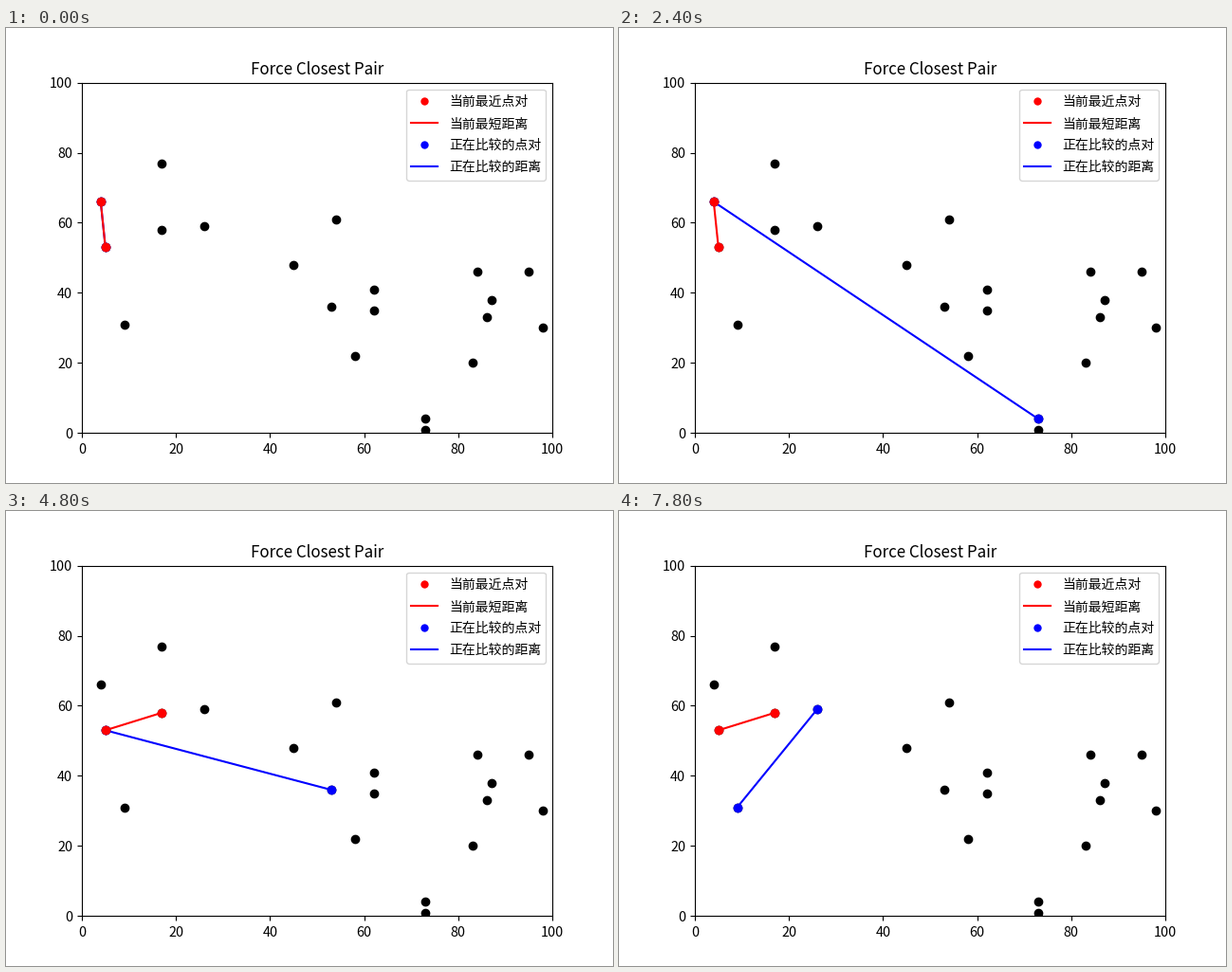
A matplotlib script that plays this animation: 640x480 px, repeating every 8 s.

```python
from itertools import combinations
from math import dist

import matplotlib.pyplot as plt
from matplotlib.animation import FuncAnimation
from matplotlib.lines import Line2D
from matplotlib.patches import FancyBboxPatch

W, H, DPI = 640, 480, 100
STEPS, STEP_MS = 40, 200
EM = 10 * DPI / 72  # legend font size in pixels

plt.rcParams["font.family"] = "Noto Sans CJK JP"

# The input of the search, sorted by x.
points = [
    (4, 66), (5, 53), (9, 31), (17, 58), (17, 77), (26, 59), (45, 48),
    (53, 36), (54, 61), (58, 22), (62, 35), (62, 41), (73, 1), (73, 4),
    (83, 20), (84, 46), (86, 33), (87, 38), (95, 46), (98, 30),
]
pairs = list(combinations(points, 2))[:STEPS]

fig, ax = plt.subplots(figsize=(W / DPI, H / DPI), dpi=DPI)
ax.set(xlim=(0, 100), ylim=(0, 100))
ax.set_title("Force Closest Pair", fontsize=12.2)
ax.tick_params(labelsize=10.4)
ax.tick_params(axis="x", pad=4)

ax.plot(*zip(*points), "o", color="black")
compared, = ax.plot([], [], "o-", color="blue")
closest, = ax.plot([], [], "o-", color="red")


def draw_legend(rows):
    """Lay the legend out in pixels, in steps of its font size."""
    pixels = dict(transform=None, zorder=5)
    right, top = ax.bbox.x1 - EM / 2, ax.bbox.y1 - EM / 2
    width, pitch = 10.6 * EM, 23
    height = len(rows) * pitch + 0.3 * EM
    left = right - width
    ax.add_artist(FancyBboxPatch(
        (left, top - height), width, height, facecolor="white",
        edgecolor="0.8", alpha=0.8, snap=True,
        boxstyle=f"round,pad=0,rounding_size={0.2 * EM}", **pixels))
    for i, (color, is_dot, label) in enumerate(rows):
        y = top - 0.9 * EM - pitch * i
        x = left + 0.4 * EM
        if is_dot:
            handle = Line2D([x + EM], [y], marker="o", markeredgewidth=0,
                            color=color, **pixels)
        else:
            handle = Line2D([x, x + 2 * EM], [y, y], color=color, **pixels)
        ax.add_artist(handle)
        ax.text(x + 2.86 * EM, y - 0.38 * EM, label, fontsize=10, **pixels)


def update(step):
    best = min(pairs[:step + 1], key=lambda pair: dist(*pair))
    compared.set_data(*zip(*pairs[step]))
    closest.set_data(*zip(*best))
    return compared, closest


draw_legend([
    ("red", True, "当前最近点对"),
    ("red", False, "当前最短距离"),
    ("blue", True, "正在比较的点对"),
    ("blue", False, "正在比较的距离"),
])
anim = FuncAnimation(fig, update, frames=STEPS, interval=STEP_MS,
                     repeat=True, repeat_delay=0)
plt.show()
```
